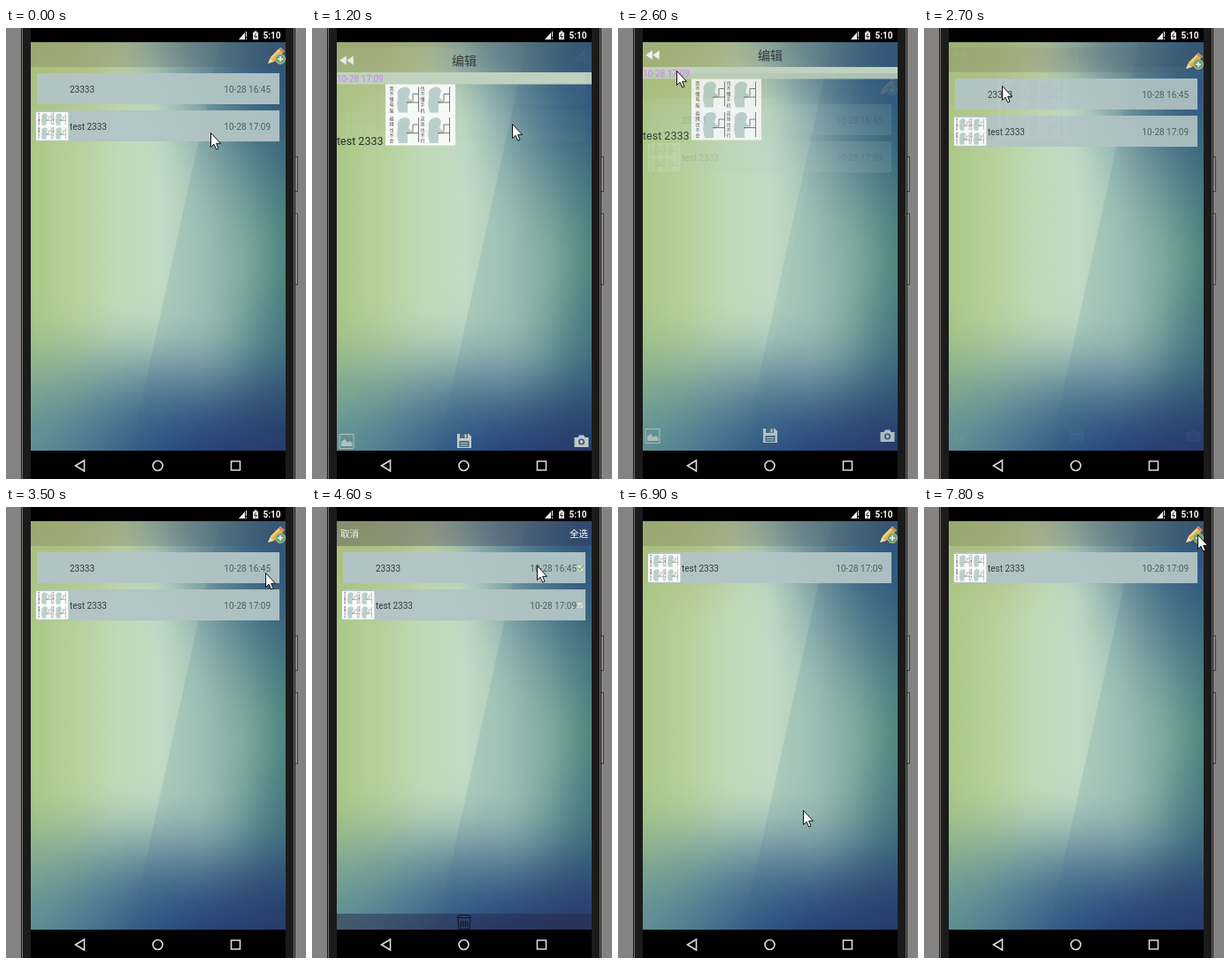
An HTML page with a canvas that plays this animation: 339x509 px, repeating every 8 s.

```html
<!DOCTYPE html>
<html lang="zh">
<head>
<meta charset="utf-8">
<style>
html, body { margin: 0; width: 100%; height: 100%; overflow: hidden; background: #858381; }
canvas { display: block; }
</style>
</head>
<body>
<canvas id="stage" width="339" height="509"></canvas>
<script>
const c = document.getElementById('stage').getContext('2d');
const LOOP = 8000;
const SANS = 'Roboto, "Noto Sans CJK SC", "Noto Sans CJK", sans-serif';

// Pointer keys: time, x, y
const POINTER = [
  [0, 231, 118], [100, 226, 108], [1200, 226, 108], [1600, 214, 108], [1700, 214, 108],
  [1800, 162, 85], [2000, 75, 45], [2200, 43, 30], [2500, 43, 30], [2700, 88, 65],
  [3300, 307, 82], [3400, 307, 82], [3700, 266, 58], [3900, 254, 66], [4700, 254, 66],
  [5000, 190, 260], [5300, 105, 462], [5400, 122, 473], [5600, 162, 467], [6600, 162, 467],
  [7000, 225, 300], [7500, 307, 55], [7800, 309, 31], [8000, 309, 31]
];

function rect(x, y, w, h, fill) {
  c.fillStyle = fill;
  c.fillRect(x, y, w, h);
}

function text(s, x, y, size, fill, align = 'left', weight = 400) {
  c.font = `${weight} ${size}px ${SANS}`;
  c.textAlign = align;
  c.fillStyle = fill;
  c.fillText(s, x, y);
}

function shape(d, fill, stroke, width = 1) {
  const p = new Path2D(d);
  if (fill) { c.fillStyle = fill; c.fill(p); }
  if (stroke) { c.strokeStyle = stroke; c.lineWidth = width; c.stroke(p); }
}

function disc(x, y, r, fill, stroke, width = 1) {
  c.beginPath();
  c.arc(x, y, r, 0, 7);
  if (fill) { c.fillStyle = fill; c.fill(); }
  if (stroke) { c.strokeStyle = stroke; c.lineWidth = width; c.stroke(); }
}

function at(x, y, scale, draw) {
  c.save();
  c.translate(x, y);
  c.scale(scale, scale);
  draw();
  c.restore();
}

// Soft elliptical spot of colour
function blob(x, y, rx, ry, rgb, a) {
  c.save();
  c.translate(x, y);
  c.scale(rx, ry);
  const g = c.createRadialGradient(0, 0, 0, 0, 0, 1);
  for (let p = 0; p <= 1; p += .125) {
    g.addColorStop(p, `rgba(${rgb},${a * (1 + Math.cos(Math.PI * p)) / 2})`);
  }
  c.fillStyle = g;
  c.fillRect(-1, -1, 2, 2);
  c.restore();
}

function wallpaper() {
  c.save();
  c.beginPath();
  c.rect(28, 16, 288, 461);
  c.clip();
  const g = c.createLinearGradient(28, 0, 316, 0);
  ['#abc886', '#b7d09b', '#c0d9b6', '#c1dbc5', '#aecdbd', '#8bb6a5', '#568f80']
    .forEach((col, i) => g.addColorStop(i / 6, col));
  rect(28, 16, 288, 461, g);
  blob(80, 10, 140, 140, '168,178,110', .6);
  blob(325, 20, 190, 260, '46,84,126', 1);
  blob(215, 5, 110, 100, '80,118,132', .5);
  blob(40, 500, 240, 200, '88,140,150', .9);
  blob(160, 485, 200, 190, '82,130,150', .85);
  blob(335, 400, 120, 170, '62,104,130', .7);
  blob(235, 515, 230, 190, '32,64,124', 1);
  blob(320, 500, 160, 150, '38,52,104', .95);
  shape('M242 16H316V477H141Z', 'rgba(45,90,120,.12)');
  c.restore();
}

function cartoon() {
  rect(0, 0, 79, 69, '#fbfcfa');
  ['我不懂电脑', '也不懂手机', '编辑也不会', '这张也不行'].forEach((line, i) => at(i % 2 * 35, (i >> 1) * 34.5, 1, () => {
    [...line].forEach((ch, k) => text(ch, 7, 6 + k * 6.3, 5, '#444', 'center'));
    shape('M14 13C11 3 27 -1 28 8L26 15L32 20L25 22V32H15L13 23Z', '#bbd0cc');
    shape('M24 20.5H38M37.5 3V31M31 19V11H37', null, '#555', .8);
  }));
}

function row(y, title, date, picture, check) {
  rect(35, y, 274, 35, 'rgba(179,196,198,.95)');
  if (picture) at(34, y + 2, .46, cartoon);
  text(title, 72, y + 22, 10, '#353c3c');
  text(date, 299, y + 22, 10, '#525c5e', 'right');
  if (check) {
    rect(300, y + 15, 6, 6, '#dfe2d2');
    shape(`M300.5 ${y + 17.5}l2 2.5l4 -5`, null, check, 1.2);
  }
}

function pencil() {
  shape('M296 40L299 33L310 22L315 26L303 38Z', '#e9ad45');
  shape('M299 33L310 22L312 23.5L300.5 35Z', '#f7d27c');
  shape('M308 24L310 22L315 26L313 28Z', '#c9855f');
  shape('M296 40L298.5 34L302.5 38Z', '#ead9b4');
  disc(310, 35, 5.5, '#71a06f', '#a9c4a0');
  shape('M307 35H313M310 32V38', null, '#f2f7ee', 1.6);
}

function listPage(selecting, deleted) {
  wallpaper();
  rect(28, 16, 288, 28, selecting ? 'rgba(55,45,75,.32)' : 'rgba(85,80,75,.2)');
  if (!deleted) row(51, '23333', '10-28 16:45', false, selecting && '#55b03c');
  row(deleted ? 51 : 93, 'test 2333', '10-28 17:09', true, selecting && '#c4b39c');
  if (!selecting) return pencil();
  text('取消', 32, 34, 10.5, '#f4f4f4');
  text('全选', 312, 34, 10.5, '#fff', 'right', 500);
  rect(28, 459, 288, 18, 'rgba(40,40,72,.5)');
  shape('M163.5 463.5H180M165 464L166 476H178L179 464M164 462L168 460.5H176L179 462M168.5 467V474M171 467V474M173.5 467V474M176 467V474',
    null, '#10182c', 1.2);
}

function editPage() {
  const icon = '#c6d0cd', dim = '#b4c4c2';
  wallpaper();
  rect(28, 16, 288, 28, 'rgba(85,85,85,.14)');
  text('编辑', 172, 36, 14, '#34393a', 'center');
  shape('M31 30.5L39 25V36ZM39 30.5L47 25V36Z', '#eef1ea', '#aeb8a9', .6);
  rect(28, 44, 288, 13.5, '#c0d2bf');
  text('10-28 17:09', 28, 55, 10, '#d47ff0');
  text('test 2333', 28, 126, 12.5, '#22282a');
  at(83, 57.5, 1, cartoon);
  shape('M31 452.5H47V468.5H31Z', null, dim, 1);
  shape('M33 465V461L37 458L40 462L43 460L45.5 463V466H33Z', dim);
  shape('M164 452H177L180 455V468H164Z', icon);
  rect(167, 452, 9, 5, '#4c6a80');
  rect(172.5, 452.5, 2, 4, icon);
  rect(166.5, 460, 11, 7, '#4c6a80');
  shape('M168 462.5H176M168 465H176', null, icon);
  shape('M296.5 456H300.5L302 453.5H307L308.5 456H312.5V467H296.5Z', icon);
  disc(304.5, 461, 3.6, '#3d587a');
  disc(304.5, 461, 1.9, icon);
}

// Pages are drawn to their own sheet so that each fades as one picture
const stage = c.canvas;
const sheet = document.createElement('canvas');
const backup = document.createElement('canvas');
for (const s of [sheet, backup]) { s.width = 339; s.height = 509; }

function copy(to, from) {
  const k = to.getContext('2d');
  k.clearRect(0, 0, 339, 509);
  k.drawImage(from, 0, 0);
}

function toSheet(page) {
  copy(backup, stage);
  c.clearRect(0, 0, 339, 509);
  page();
  copy(sheet, stage);
  copy(stage, backup);
}

// Window-open motion: slide up and fade in over the previous page
function open(ms, oldPage, newPage) {
  if (ms >= 350) return newPage();
  const left = (span, power) => Math.max(0, 1 - ms / span) ** power;
  oldPage();
  toSheet(newPage);
  c.globalAlpha = 1 - left(200, 4);
  c.drawImage(sheet, 0, Math.round(39 * left(350, 5)));
  c.globalAlpha = 1;
}

function phone() {
  const side = '#858381', body = '#1b1b1b', edge = '#757371';
  rect(0, 0, 28, 509, side);
  rect(316, 0, 23, 509, side);
  rect(17, 0, 11, 509, body);
  rect(18, 0, 1, 509, edge);
  rect(316, 0, 11, 509, body);
  rect(325, 0, 1, 509, edge);
  for (const [y, h] of [[145, 40], [209, 81]]) {
    rect(327, y, 3, h, '#45433f');
    rect(327, y + 1, 2, h - 2, '#8b8987');
  }
  rect(28, 0, 288, 16, '#000');
  rect(28, 477, 288, 32, '#000');
  shape('M263 13L270 5V13Z', '#f2f2f2');
  shape('M271.5 4V10M271.5 11.5V13', null, '#ddd', 1.2);
  shape('M279 5H280.5V3.5H283.5V5H285V13H279Z', '#e9e9e9');
  shape('M282.5 6L280.5 9.5H283.5L281.5 12', null, '#222', .9);
  text('5:10', 310.5, 12, 10, '#fff', 'right', 700);
  shape('M78.5 494L88.5 488V500Z', null, '#dadada', 1.6);
  disc(171.5, 494, 5.5, null, '#dadada', 1.6);
  shape('M254.5 489H264.5V499H254.5Z', null, '#dadada', 1.6);
}

function pointer(t) {
  const i = POINTER.findIndex(k => k[0] > t);
  const [t0, x0, y0] = POINTER[i - 1], [t1, x1, y1] = POINTER[i];
  const p = (t - t0) / (t1 - t0);
  at(Math.round(x0 + (x1 - x0) * p), Math.round(y0 + (y1 - y0) * p), 1, () =>
    shape('M.5 .5V16.5L4 13.2L6.6 19L9 18L6.6 12.3H11.5Z', '#fff', '#111', 1));
}

function draw(now) {
  const t = Math.floor(now % LOOP / 100) * 100;
  const list = () => listPage(false, false);
  c.clearRect(0, 0, 339, 509);
  if (t < 1100) list();
  else if (t < 2600) open(t - 1092, list, editPage);
  else if (t < 4600) open(t - 2592, editPage, list);
  else listPage(t < 6700, t >= 6700);
  phone();
  pointer(t);
}

const start = performance.now();
(function tick() {
  draw(performance.now() - start);
  requestAnimationFrame(tick);
})();
</script>
</body>
</html>
```
